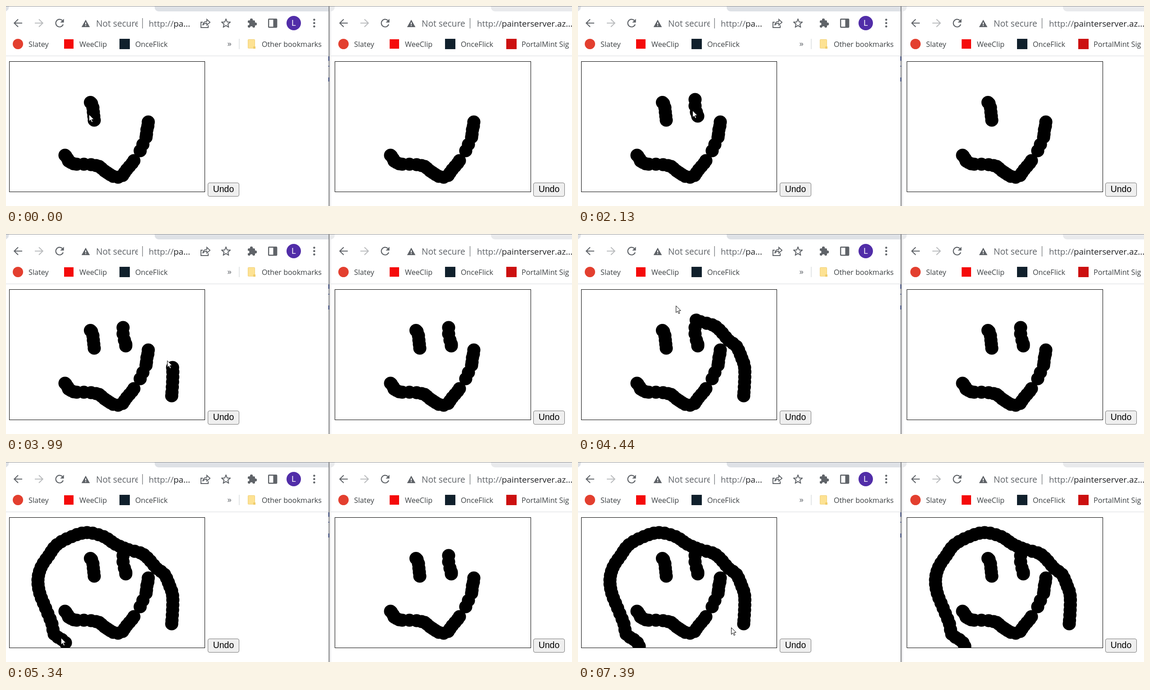
An HTML page that plays this animation: 1257x445 px, repeating every 7490 ms.

```html
<!DOCTYPE html>
<html lang="en">
<head>
<meta charset="utf-8">
<title>Shared painter</title>
<style>
html, body { margin: 0; width: 100%; height: 100%; overflow: hidden; background: #fff; }
#stage { display: block; width: 1257px; height: 445px; }
text { font-family: "Open Sans", "Noto Sans", sans-serif; white-space: pre; }
</style>
</head>
<body>
<svg id="stage" viewBox="0 0 1257 445"></svg>
<script>
const stage = document.getElementById('stage');
const LOOP = 7490, SHIFT = 723, BRUSH = 14.6;
const GREY = '#5f6368', INK = '#3c4043';

// Brush dabs: x, y
const mouth = [
  [131,332],[133,334],[137,340],[139,345],[144,348],[150,351],[157,352],[173,352],
  [189,353],[200,355],[207,357],[212,361],[219,367],[225,371],[231,375],[238,379],
  [249,381],[259,377],[263,371],[268,364],[274,357],[280,350],[284,344],[298,322],
  [304,308],[311,292],[312,285],[313,275],[315,267],[316,258]
];
const leftEye = [[187.5,214.5],[190,217],[193,226],[194,236],[195,245],[196,254]];

// Timed strokes: x, y, ms
const rightEye = dabs([
  [260,208,1420],[260,222,1560],[263,236,1760],[266,245,1870],[266,249,2330]
]);
const headPath = [
  [368,360,3780],[370,329,3880],[370,297,3985],[364,277,4080],[352,250,4180],[335,237,4250],
  [314,213,4310],[298,202,4360],[272,195,4420],[243,183,4480],[217,166,4530],[180,157,4590],
  [146,166,4640],[113,184,4690],[95,208,4760],[78,234,4825],[71,262,4890],[75,292,4950],
  [88,325,5020],[102,360,5100],[107,383,5160],[124,395,5240],[132,402,5320],[136,410,5430]
];
const head = dabs(headPath);

// Pointer rests and moves: ms, x, y
const pointerBefore = [
  [0,184,241],[110,185,240],[400,220,212],[700,248,195],[1390,248,195],[1880,254,231],
  [2040,254,231],[2340,254,235],[2640,254,235],[2970,378,276],[3360,353,350],[3450,352,350],
  [3750,352,350],[3780,356,346]
];
const pointerAfter = [
  [5430,124,396],[5890,124,396],[5980,130,406],[6130,270,365],[6300,325,290],[6560,240,230],
  [6650,240,230],[6820,206,197],[7030,385,290],[7200,372,420],[7390,340,368],[7490,340,368]
];

function spline(p, i, f) {
  const a = p[Math.max(i - 1, 0)], b = p[i], c = p[i + 1], d = p[Math.min(i + 2, p.length - 1)];
  const axis = k => b[k] + 0.5 * f * (c[k] - a[k] +
    f * (2 * a[k] - 5 * b[k] + 4 * c[k] - d[k] + f * (3 * (b[k] - c[k]) + d[k] - a[k])));
  return [axis(0), axis(1), b[2] + (c[2] - b[2]) * f];
}

function dabs(path) {
  const out = [path[0]];
  for (let i = 0; i < path.length - 1; i++) {
    const [a, b] = [path[i], path[i + 1]];
    const n = Math.max(1, Math.round(Math.hypot(b[0] - a[0], b[1] - a[1]) / 11));
    for (let k = 1; k <= n; k++) out.push(spline(path, i, k / n));
  }
  return out;
}

function lerpKeys(keys, t) {
  let i = 0;
  while (i < keys.length - 2 && t > keys[i + 1][0]) i++;
  const a = keys[i], b = keys[i + 1];
  const f = Math.min(1, Math.max(0, (t - a[0]) / (b[0] - a[0])));
  return [a[1] + (b[1] - a[1]) * f, a[2] + (b[2] - a[2]) * f];
}

function pointerAt(t) {
  if (t < 3780) return lerpKeys(pointerBefore, t);
  if (t >= 5430) return lerpKeys(pointerAfter, t);
  // The pointer runs ahead of the ink on the fast part of the stroke
  const lead = 80 * Math.sin(Math.PI * Math.max(0, (t - 3990) / 1440));
  const ahead = Math.min(t + lead, 5430);
  let i = 0;
  while (i < headPath.length - 2 && ahead > headPath[i + 1][2]) i++;
  const f = (ahead - headPath[i][2]) / (headPath[i + 1][2] - headPath[i][2]);
  const [x, y] = spline(headPath, i, f);
  return [x - 12, y - 14];
}

// Markup helpers
const rect = (x, y, w, h, fill, more = '') =>
  `<rect x="${x}" y="${y}" width="${w}" height="${h}" fill="${fill}" ${more}/>`;
const disc = (x, y, r, fill) => `<circle cx="${x}" cy="${y}" r="${r}" fill="${fill}"/>`;
const fillPath = (d, fill) => `<path d="${d}" fill="${fill}"/>`;
const line = (d, color = GREY, w = 2) =>
  `<path d="${d}" fill="none" stroke="${color}" stroke-width="${w}"/>`;
const text = (str, x, y, size, fill, more = '') =>
  `<text x="${x}" y="${y}" font-size="${size}" fill="${fill}" ${more}>${str}</text>`;
const label = (str, x) => text(str, x, 90.5, 16.2, INK);
const shift = (dx, body) => `<g transform="translate(${dx})">${body}</g>`;
const clip = (x, y, w, h, body) =>
  `<svg x="${x}" y="${y}" width="${w}" height="${h}" viewBox="${x} ${y} ${w} ${h}">${body}</svg>`;

const arrow = (x, dir, color) =>
  line(`M${x - 9 * dir} 38H${x + 9 * dir}M${x} 29.5L${x - 8.7 * dir} 38L${x} 46.5`, color, 2.1);

const address = (x, host) =>
  text(`http://<tspan fill="#202124">${host}</tspan>`, x, 46, 18.8, GREY);

const bar = () =>
  arrow(27, 1, GREY) + arrow(73, -1, '#babcbe') +
  line('M126.9 40.9A8.4 8.4 0 1 1 124.9 32.1', GREY, 2.2) +
  fillPath('M128.6 28.5V36.8H120.3Z', GREY) +
  fillPath('M177 30.5L186.3 47H167.7Z', GREY) +
  rect(176, 36.5, 2, 4.5, '#fff') + rect(176, 42.5, 2, 2, '#fff') +
  disc(26.5, 84.5, 11.5, '#e33f2f') + label('Slatey', 50) +
  rect(129, 74, 21, 21, '#f50a0a') + label('WeeClip', 163) +
  rect(252, 73, 23, 23, '#10202c') + label('OnceFlick', 287);

const shareIcon = () =>
  line('M437 36H433V48H449V43') +
  line('M437 43Q438 34.5 446 34.3V29.8L453 36.3L446 42.5V38.3Q440 38.2 437 43', GREY, 1.9);

function starIcon() {
  const pts = Array.from({ length: 10 }, (_, i) => {
    const r = i % 2 ? 4.4 : 10.2, a = i * Math.PI / 5 - Math.PI / 2;
    return [488.5 + r * Math.cos(a), 39 + r * Math.sin(a)];
  });
  return `<polygon points="${pts.join(' ')}" fill="none" stroke="${GREY}" stroke-width="2" stroke-linejoin="round"/>`;
}

const puzzleIcon = () =>
  rect(537, 32, 16, 16, GREY, 'rx="2"') + disc(545, 31, 3.2, GREY) + disc(554, 40, 3.2, GREY) +
  disc(537.5, 40, 3, '#fff') + disc(545, 48, 3, '#fff');

const leftChrome = () =>
  fillPath('M330 0H717V12H339A9 9 0 0 1 330 3Z', '#dee1e6') +
  fillPath('M0 0H7L5 8L0 12Z', '#dee1e6') +
  bar() +
  clip(200, 20, 93, 40, text('Not secure', 200, 46, 19.2, GREY)) +
  rect(302.5, 27, 1.5, 23, '#85888c') + address(317, 'pa...') +
  shareIcon() + starIcon() + puzzleIcon() +
  rect(583.2, 29.2, 18, 18, 'none', `rx="1" stroke="${GREY}" stroke-width="2.4"`) +
  rect(593.5, 29, 8, 18, GREY) +
  disc(639, 38, 16, '#512da8') +
  text('L', 634.3, 44, 17.5, '#fff', 'style="font-family:Roboto,sans-serif"') +
  [30.5, 38, 45.5].map(y => disc(684.5, y, 2.3, GREY)).join('') +
  text('»', 491.5, 89.5, 19, GREY) +
  rect(517.5, 73, 1, 23, '#c8cbd0') +
  rect(537.5, 74.5, 15, 19.5, '#fde293', 'rx="1" stroke="#efcf75"') +
  rect(549, 90, 5, 5, '#f0cd6c') +
  label('Other bookmarks', 568) +
  rect(0, 110.5, 717, 1, '#d8dadd');

const rightChrome = () =>
  fillPath('M719 0H730V3A9 9 0 0 1 721 12H719Z', '#e9eaec') +
  fillPath('M1077 0H1257V12H1086A9 9 0 0 1 1077 3Z', '#e9eaec') +
  shift(SHIFT, bar()) +
  text('Not secure', 923, 46, 19.2, GREY) +
  rect(1029.8, 27, 1.5, 23, '#85888c') + address(1046, 'painterserver.az...') +
  rect(1111, 73, 23, 23, '#cc1010') + label('PortalMint Sig', 1145) +
  rect(720, 110.5, 537, 1, '#d8dadd');

const divider = () =>
  rect(719, 12, 3, 433, '#eeeeef') +
  rect(716.5, 0, 2, 445, '#77787b') +
  [[112, 10], [133, 2], [159, 9]].map(([y, h]) => rect(716, y, 2, h, '#26366b')).join('') +
  rect(0, 0, 1257, 1, '#8d8f92');

const stroke = (points, name) =>
  `<g class="${name}">${points.map(([x, y]) => disc(x, y, BRUSH, '#000')).join('')}</g>`;

const board = (dx, width, side) => shift(dx,
  clip(8, 124, width - 1, 289,
    stroke(mouth, 'mouth') + stroke(leftEye, side + '-left-eye') +
    stroke(rightEye, side + '-right-eye') + stroke(head, side + '-head')) +
  rect(7.5, 123.5, width, 290, 'none', 'stroke="#000"') +
  rect(448.5, 393.5, 69, 30, '#efefef', 'rx="3.5" stroke="#767676"') +
  text('Undo', 459.7, 414.3, 19.5, '#000', 'style="font-family:\'Liberation Sans\',Arial,sans-serif"'));

stage.innerHTML = leftChrome() + rightChrome() + divider() +
  board(0, 434, 'own') + board(SHIFT, 435, 'remote') +
  '<path id="pointer" d="M.5 .5V15.6L4 12.4L6.4 17.8L8.8 16.8L6.4 11.5L11 11.2Z" fill="#fff" stroke="#000"/>';

const pointer = document.getElementById('pointer');
const group = name => stage.querySelector('.' + name);
const show = (node, on) => node.setAttribute('visibility', on ? 'visible' : 'hidden');

const growing = [[group('own-right-eye'), rightEye], [group('own-head'), head]];
const arrivals = [
  [group('remote-left-eye'), 260], [group('remote-right-eye'), 2790], [group('remote-head'), 6010]
];

function draw() {
  const t = performance.now() % LOOP;
  for (const [node, points] of growing) points.forEach((p, i) => show(node.children[i], p[2] <= t));
  for (const [node, at] of arrivals) show(node, t >= at);
  pointer.setAttribute('transform', `translate(${pointerAt(t)})`);
  requestAnimationFrame(draw);
}
draw();
</script>
</body>
</html>
```
